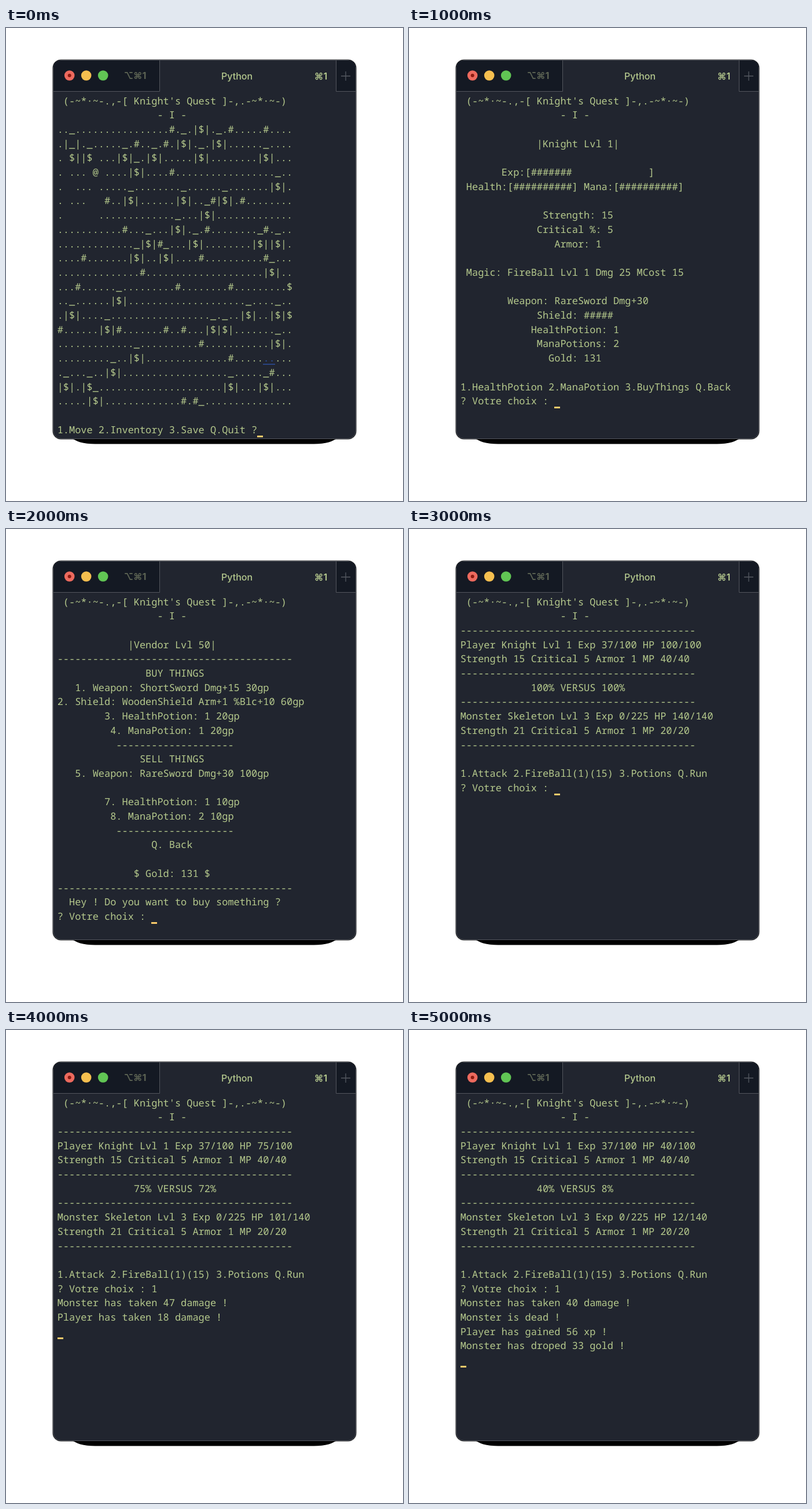
Recreate the animation shown at these times as an HTML page. Size 686 by 817 pixels, loop 6000 ms.

```html
<!DOCTYPE html>
<html lang="en">
<head>
<meta charset="utf-8">
<title>Terminal game</title>
<style>
  html, body { margin: 0; width: 100%; height: 100%; overflow: hidden; background: #fff; }
  svg, #screen div, #cursor { position: absolute; }
  svg { left: 0; top: 0; }
  svg text { font-family: Inter, "DejaVu Sans", sans-serif; fill: #b5c98e; text-anchor: middle; }
  #screen div {
    left: 88.7px; white-space: pre; color: #b5c98c;
    font: 16.95px/25px "Noto Sans Mono", "DejaVu Sans Mono", monospace;
    font-variant-ligatures: none; text-rendering: geometricPrecision;
  }
  #screen span { color: #2c4f9c; box-shadow: 0 1.5px #2c4f9c; display: inline-block; height: 21px; line-height: 21px; }
  #cursor { width: 10px; height: 3px; background: #fbcb6b; }
</style>
</head>
<body>
<svg width="686" height="817" viewBox="0 0 686 817">
  <path d="M111 706Q124 718.5 154 718.5H532Q562 718.5 575 706Z"/>
  <rect x="80.5" y="54.5" width="525" height="656" rx="14.5"/>
  <rect x="81.5" y="55.5" width="523" height="654" rx="13.5" fill="#21252f" stroke="#53565d"/>
  <g fill="#141923">
    <path d="M82 109V69Q82 56 95 56H265V109Z"/>
    <path d="M571 109V56H591Q604 56 604 69V109Z"/>
  </g>
  <path d="M82 109.5H265.5V56M570.5 56V109.5H604" fill="none" stroke="#53565d"/>
  <circle cx="109.7" cy="82" r="8.8" fill="#ed6a5e"/>
  <circle cx="109.7" cy="82" r="3" fill="#8c1a10"/>
  <circle cx="138.7" cy="82" r="8.8" fill="#f5bf4f"/>
  <circle cx="167.7" cy="82" r="8.8" fill="#61c554"/>
  <text x="223" y="87.5" font-size="16" font-weight="700" style="fill:#5c6353">⌥⌘1</text>
  <text x="399" y="88.5" font-size="16" font-weight="500">Python</text>
  <text x="544" y="88.5" font-size="16" font-weight="600">⌘1</text>
  <path d="M579 83H595M587 75V91" stroke="#555961" stroke-width="1.3"/>
</svg>
<div id="screen"></div>
<div id="cursor"></div>
<script>
const at = (column, text) => " ".repeat(column) + text;
const rule = "-".repeat(40);
const shortRule = at(10, "-".repeat(20));
const prompt = "? Votre choix : ";
const header = [at(1, "(-~*·~-.,-[ Knight's Quest ]-,.-~*·~-)"), at(17, "- I -")];

const map = String.raw`
.._................#._.|$|._.#.....#....
.|_|._....._.#.._.#.|$|._.|$|......_....
. $||$ ...|$|_.|$|.....|$|........|$|...
. ... @ ....|$|....#................._..
.  ... ....._........_......_.......|$|.
. ...   #..|$|......|$|.._#|$|.#........
.      ............._...|$|.............
...........#..._...|$|._.#........_#._..
............._|$|#_...|$|........|$||$|.
....#.......|$|..|$|....#..........#_...
..............#....................|$|..
...#......_.........#........#.........$
.._......|$|...................._...._..
.|$|...._................._._..|$|..|$|$
#......|$|#.......#..#...|$|$|......._..
............._..........#...........|$|.
........._..|$|..............#.....<span>..</span>...
._..._..|$|.................._....._#...
|$|.|$_.....................|$|...|$|...
.....|$|.............#.#_...............

1.Move 2.Inventory 3.Save Q.Quit ?`.split("\n").slice(1);

const inventory = [
  "", at(13, "|Knight Lvl 1|"), "",
  at(7, "Exp:[#######" + at(13, "]")),
  at(1, "Health:[##########] Mana:[##########]"), "",
  at(14, "Strength: 15"), at(13, "Critical %: 5"), at(16, "Armor: 1"), "",
  at(1, "Magic: FireBall Lvl 1 Dmg 25 MCost 15"), "",
  at(8, "Weapon: RareSword Dmg+30"), at(13, "Shield: #####"),
  at(12, "HealthPotion: 1"), at(13, "ManaPotions: 2"), at(15, "Gold: 131"), "",
  "1.HealthPotion 2.ManaPotion 3.BuyThings Q.Back", prompt
];

const shop = [
  "", at(12, "|Vendor Lvl 50|"), rule, at(15, "BUY THINGS"),
  at(3, "1. Weapon: ShortSword Dmg+15 30gp"),
  "2. Shield: WoodenShield Arm+1 %Blc+10 60gp",
  at(8, "3. HealthPotion: 1 20gp"), at(9, "4. ManaPotion: 1 20gp"), shortRule,
  at(14, "SELL THINGS"), at(3, "5. Weapon: RareSword Dmg+30 100gp"), "",
  at(8, "7. HealthPotion: 1 10gp"), at(9, "8. ManaPotion: 2 10gp"), shortRule,
  at(16, "Q. Back"), "", at(13, "$ Gold: 131 $"), rule,
  at(2, "Hey ! Do you want to buy something ?"), prompt
];

const fight = (playerHp, monsterHp, odds, ...log) => [
  rule, `Player Knight Lvl 1 Exp 37/100 HP ${playerHp}/100`,
  "Strength 15 Critical 5 Armor 1 MP 40/40", rule, odds, rule,
  `Monster Skeleton Lvl 3 Exp 0/225 HP ${monsterHp}/140`,
  "Strength 21 Critical 5 Armor 1 MP 20/20", rule, "",
  "1.Attack 2.FireBall(1)(15) 3.Potions Q.Run", ...log
];

const screens = [
  map, inventory, shop,
  fight(100, 140, at(12, "100% VERSUS 100%"), prompt),
  fight(75, 101, at(13, "75% VERSUS 72%"), prompt + "1",
    "Monster has taken 47 damage !", "Player has taken 18 damage !", ""),
  fight(40, 12, at(13, "40% VERSUS 8%"), prompt + "1",
    "Monster has taken 40 damage !", "Monster is dead !",
    "Player has gained 56 xp !", "Monster has droped 33 gold !", "")
];

const screen = document.getElementById("screen");
const cursor = document.getElementById("cursor");
const rowTop = row => Math.floor(113.05 + 24.7 * row);
let shown = -1;

// The cursor always sits after the last character of the last line.
function show(index) {
  const lines = [...header, ...screens[index]];
  screen.innerHTML = lines
    .map((line, row) => `<div style="top:${rowTop(row)}px">${line}</div>`).join("");
  cursor.style.left = Math.round(88.7 + 10.17 * lines.at(-1).length) + "px";
  cursor.style.top = rowTop(lines.length - 1) + 23 + "px";
  shown = index;
}

function tick() {
  const index = Math.floor(performance.now() / 1000) % screens.length;
  if (index !== shown) show(index);
  requestAnimationFrame(tick);
}
tick();
</script>
</body>
</html>
```
